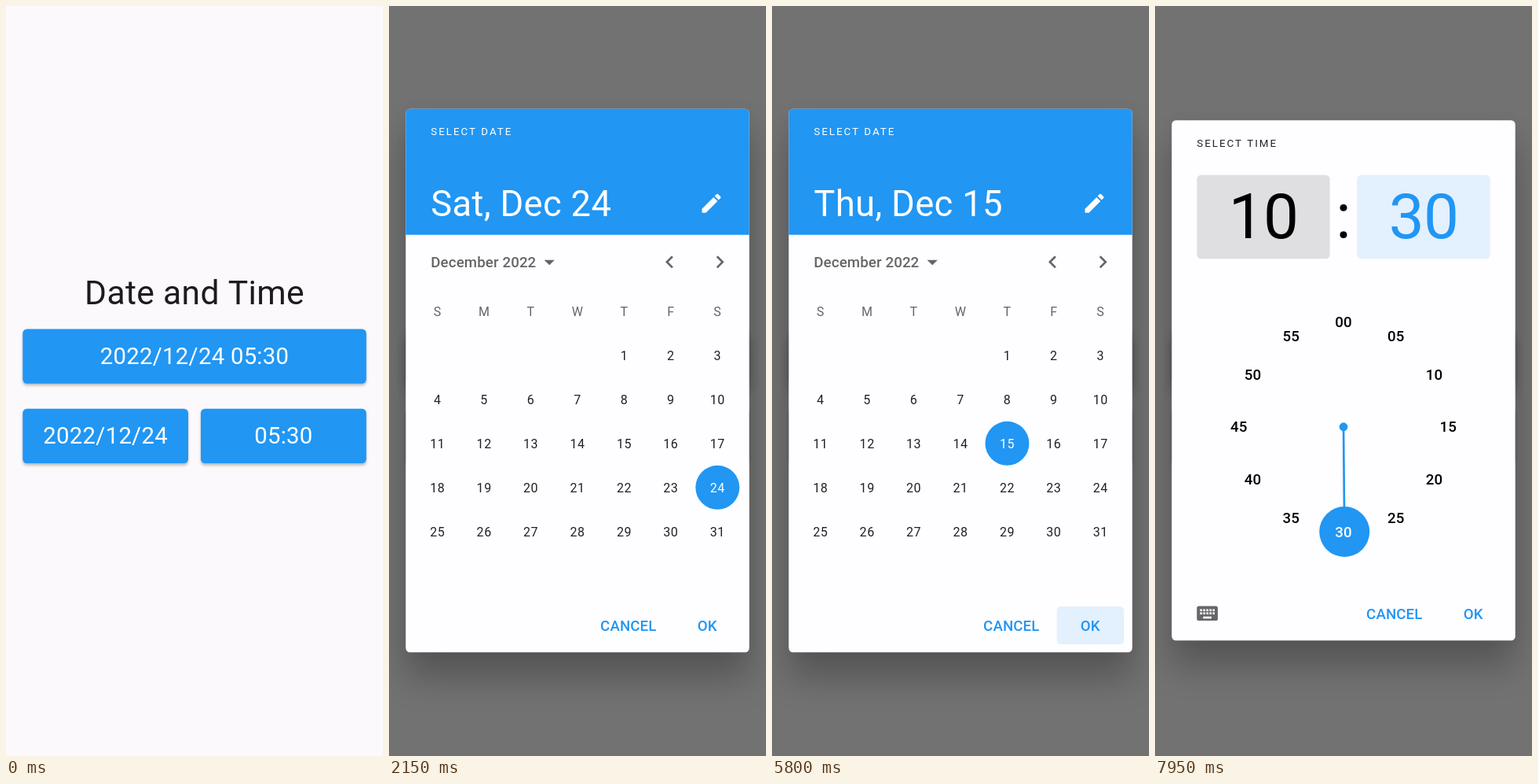
Recreate the animation shown at these times as an HTML page with a canvas. Size 480x953 px, loop 8000 ms.

```html
<!DOCTYPE html>
<html lang="en">
<head>
<meta charset="utf-8">
<title>Date and time picker</title>
<style>
html, body { margin: 0; width: 100%; height: 100%; overflow: hidden; background: #fbf9fc; }
canvas { display: block; width: 480px; height: 953px; }
</style>
</head>
<body>
<canvas id="stage" width="480" height="953"></canvas>
<script>
const ctx = document.getElementById('stage').getContext('2d');
const DP = 4 / 3, W = 480, H = 953, LOOP = 8000;
const PAGE = '#fbf9fc', SHEET = '#fefdff', BLUE = '#2196f3';
const INK = 'rgba(0,0,0,.87)', GREY = 'rgba(0,0,0,.6)', FAINT = 'rgba(0,0,0,.12)';
const tint = a => `rgba(33,150,243,${a})`;

// Times of the hard changes, in ms
const PRESS = 600, DATE_OPEN = 2150, DAY_DOWN = 3765, DAY_HOLD = 4150, DAY_PICK = 4300;
const OK_DOWN = 4950, TIME_OPEN = 6150, HOUR_PICK = 7850;

const ICON = {
  edit: 'M3 17.25V21h3.75L17.81 9.94l-3.75-3.75L3 17.25zM20.71 7.04c.39-.39.39-1.02 0-1.41l-2.34-2.34c-.39-.39-1.02-.39-1.41 0l-1.83 1.83 3.75 3.75 1.83-1.83z',
  drop: 'M7 10l5 5 5-5z',
  left: 'M15.41 7.41L14 6l-6 6 6 6 1.41-1.41L10.83 12z',
  right: 'M10 6L8.59 7.41 13.17 12l-4.58 4.59L10 18l6-6z'
};

const clamp = v => Math.max(0, Math.min(1, v));
const mix = (a, b, k) => a + (b - a) * k;

function bezier(x1, y1, x2, y2) {
  const at = (a, b, s) => 3 * a * s * (1 - s) ** 2 + 3 * b * s * s * (1 - s) + s ** 3;
  return x => {
    if (x <= 0 || x >= 1) return clamp(x);
    let lo = 0, hi = 1;
    for (let i = 0; i < 24; i++) {
      const mid = (lo + hi) / 2;
      if (at(x1, x2, mid) < x) lo = mid; else hi = mid;
    }
    return at(y1, y2, lo);
  };
}
const ease = bezier(.25, .1, .25, 1);
const fastOutSlowIn = bezier(.4, 0, .2, 1);

function box(x, y, w, h, fill, r = 4 * DP) {
  ctx.beginPath();
  ctx.roundRect(x, y, w, h, r);
  ctx.fillStyle = fill;
  ctx.fill();
}

function disc(x, y, r, fill) {
  ctx.beginPath();
  ctx.arc(x, y, r, 0, Math.PI * 2);
  ctx.fillStyle = fill;
  ctx.fill();
}

function text(str, x, y, size, color, { weight = 400, spacing = 0, align = 'center' } = {}) {
  ctx.font = `${weight} ${size}px Roboto, sans-serif`;
  ctx.letterSpacing = spacing + 'px';
  ctx.textAlign = align;
  ctx.fillStyle = color;
  ctx.fillText(str, x, y);
}

function icon(path, cx, cy, color) {
  ctx.save();
  ctx.translate(cx - 16, cy - 16);
  ctx.scale(DP, DP);
  ctx.fillStyle = color;
  ctx.fill(new Path2D(path));
  ctx.restore();
}

// Only the shadow lands on the stage; the shape itself is drawn far off to the left.
function shadow(x, y, w, h, elevation) {
  const away = 2000;
  const cast = (dy, blur, alpha) => {
    ctx.shadowColor = `rgba(0,0,0,${alpha})`;
    ctx.shadowOffsetX = away;
    ctx.shadowOffsetY = dy;
    ctx.shadowBlur = blur;
    box(x - away, y, w, h, '#000');
  };
  ctx.save();
  cast(elevation * DP, elevation * DP * DP, .25);
  cast(0, elevation * DP / 2, .04);
  ctx.restore();
}

function ripple(x, y, w, h, touchX, age, color) {
  if (age <= 0) return;
  const k = ease(age / 1000), full = Math.hypot(w, h) / 2;
  ctx.save();
  ctx.beginPath();
  ctx.roundRect(x, y, w, h, 4 * DP);
  ctx.clip();
  ctx.globalAlpha = clamp(age / 75);
  disc(mix(touchX, x + w / 2, k), y + h / 2, mix(full * .3, full + 5 * DP, k), color);
  ctx.restore();
}

function button(label, x, y, w, age = 0) {
  const h = 69.3;
  shadow(x, y, w, h, mix(2, 8, clamp(age / 200)));
  box(x, y, w, h, BLUE);
  ripple(x, y, w, h, 378, age, 'rgba(255,255,255,.24)');
  text(label, x + w / 2, y + 44.5, 22 * DP, '#fff', { spacing: .25 });
}

function page(t) {
  ctx.fillStyle = PAGE;
  ctx.fillRect(0, 0, W, H);
  text('Date and Time', 240, 379, 32 * DP, '#1d1b20', { spacing: .33 });
  button('2022/12/24 05:30', 21.3, 410.4, 437.4, t - PRESS);
  button('2022/12/24', 21.3, 511.8, 210.7);
  button('05:30', 248, 511.8, 210.7);
}

function sheet(y, h) {
  ctx.fillStyle = 'rgba(0,0,0,.54)';
  ctx.fillRect(0, 0, W, H);
  shadow(21.3, y, 437.4, h, 24);
  box(21.3, y, 437.4, h, SHEET);
}

function actions(y) {
  const style = { weight: 500, spacing: .13 };
  text('CANCEL', 304.8, y, 14 * DP, BLUE, style);
  text('OK', 405.3, y, 14 * DP, BLUE, style);
}

const overline = (str, y, color) =>
  text(str, 53.3, y, 10 * DP, color, { spacing: 2, align: 'left' });

function datePicker(t) {
  const picked = t >= DAY_PICK ? 15 : 24;
  const colX = c => 61.7 + 59.43 * c, rowY = r => 443.8 + 56 * r;

  sheet(130.7, 690.5);
  box(21.3, 130.7, 437.4, 160, BLUE, [4 * DP, 4 * DP, 0, 0]);
  overline('SELECT DATE', 164, '#fff');
  text(picked === 15 ? 'Thu, Dec 15' : 'Sat, Dec 24', 53.3, 267, 34 * DP, '#fff',
    { spacing: .33, align: 'left' });
  icon(ICON.edit, 410.5, 250.7, '#fff');

  text('December 2022', 53.3, 331.7, 14 * DP, GREY, { weight: 500, spacing: .13, align: 'left' });
  icon(ICON.drop, 204.2, 325.3, GREY);
  icon(ICON.left, 357.3, 325.3, GREY);
  icon(ICON.right, 421.3, 325.3, GREY);

  [...'SMTWTFS'].forEach((d, c) => text(d, colX(c), 393.5, 12 * DP, GREY, { spacing: .53 }));

  // Ink of the pressed day, below its number
  if (t > DAY_DOWN) {
    const k = t < DAY_PICK ? (Math.min(t, DAY_HOLD) - DAY_DOWN) / 1000 : 1;
    const alpha = .38 * (1 - clamp((t - DAY_PICK) / 200));
    disc(mix(291.5, colX(4), k), mix(561, rowY(2), k), 25 * DP * k, tint(alpha));
  }
  for (let day = 1; day <= 31; day++) {
    const x = colX((day + 3) % 7), y = rowY(Math.floor((day + 3) / 7));
    if (day === picked) disc(x, y, 28, BLUE);
    text(day, x, y + 5.7, 12 * DP, day === picked ? '#fff' : INK, { spacing: .53 });
  }

  ripple(362.7, 763, 85.3, 48, 405, t - OK_DOWN, tint(.12));
  actions(793.6);
}

function keyboard(x, y) {
  box(x, y, 20 * DP, 14 * DP, '#666568', 2 * DP);
  const key = (c, r, w) => box(x + c * DP, y + r * DP, w * DP, 2 * DP, SHEET, 0);
  for (let c = 3; c <= 15; c += 3) {
    key(c, 3, 2);
    key(c, 6, 2);
  }
  key(6, 10, 8);
}

function field(value, x, active) {
  box(x, 214.7, 169.4, 106.6, active ? tint(.12) : FAINT);
  text(value, x + 84.7, 295, 60 * DP, active ? BLUE : '#000', { spacing: -.67 });
}

function dial(step, deg) {
  const cx = 240, cy = 534.7, R = 100 * DP;
  const spot = d => [cx + R * Math.sin(d * Math.PI / 180), cy - R * Math.cos(d * Math.PI / 180)];
  const labels = color => {
    for (let i = 0; i < 12; i++) {
      const [x, y] = spot(i * 30);
      text(String(i * step).padStart(2, '0'), x, y + 6.6, 14 * DP, color, { weight: 500, spacing: .13 });
    }
  };
  const [hx, hy] = spot(deg);

  labels('#000');
  disc(cx, cy, 4 * DP, BLUE);
  ctx.beginPath();
  ctx.moveTo(cx, cy);
  ctx.lineTo(hx, hy);
  ctx.lineWidth = 2 * DP;
  ctx.strokeStyle = BLUE;
  ctx.stroke();
  disc(hx, hy, 24 * DP, BLUE);
  if (deg % 30 > 5.7 && deg % 30 < 25.8) disc(hx, hy, 2 * DP, '#fff');

  // Labels turn white where the handle covers them
  ctx.save();
  ctx.beginPath();
  ctx.arc(hx, hy, 24 * DP, 0, Math.PI * 2);
  ctx.clip();
  labels('#fff');
  ctx.restore();
}

function timePicker(t) {
  const minutes = t >= HOUR_PICK;
  sheet(145.3, 661);
  overline('SELECT TIME', 178.7, INK);
  field(minutes ? '10' : '05', 53.3, !minutes);
  field('30', 257.3, minutes);
  text(':', 240, 295, 60 * DP, '#000');
  if (minutes) dial(5, mix(150, 180, fastOutSlowIn((t - HOUR_PICK + 65) / 200)));
  else dial(2, 75);
  keyboard(53.3, 762.4);
  actions(778.6);
}

function draw(now) {
  const t = now % LOOP;
  page(t);
  if (t >= TIME_OPEN) timePicker(t);
  else if (t >= DATE_OPEN) datePicker(t);
}

const start = performance.now();
function tick() {
  draw(performance.now() - start);
  requestAnimationFrame(tick);
}
tick();
</script>
</body>
</html>
```
